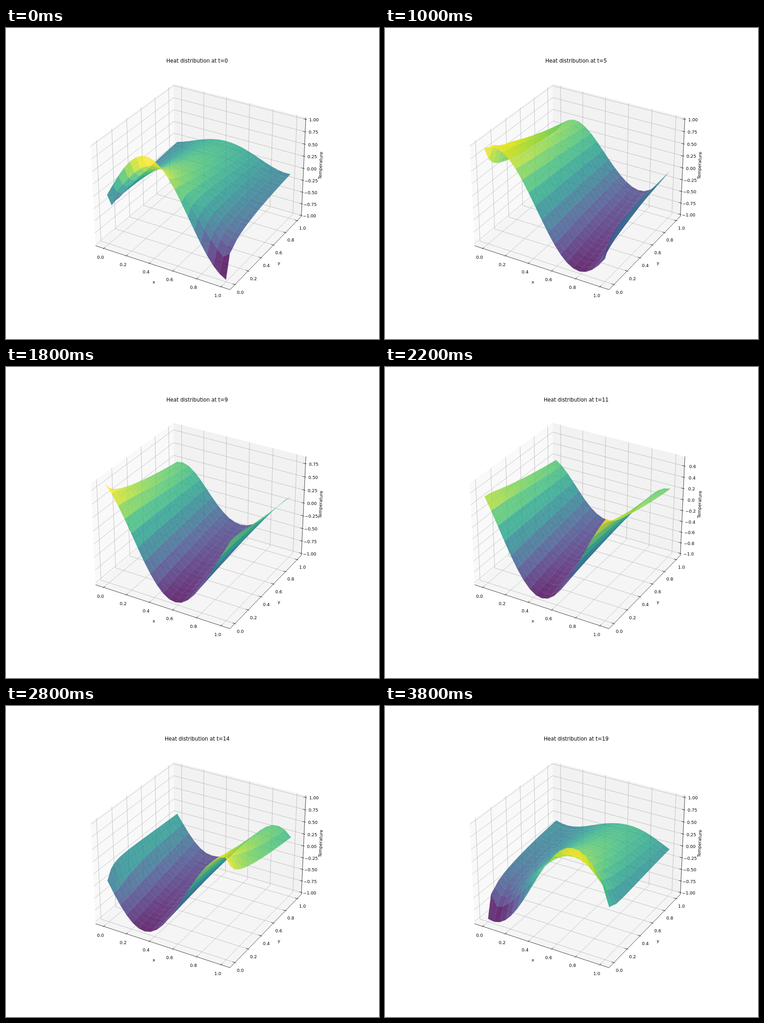
Recreate the animation shown at these times as an HTML page with a canvas. Size 820 px wide and 683 px high, loop 4000 ms.

```html
<!DOCTYPE html>
<html lang="en">
<head>
<meta charset="utf-8">
<title>Heat distribution</title>
<style>
  html, body { margin: 0; width: 100%; height: 100%; overflow: hidden; background: #fff; }
  svg, canvas { position: absolute; left: 0; top: 0; width: 820px; height: 683px; }
  text { font-family: "DejaVu Sans", Verdana, sans-serif; font-size: 9.49px; text-anchor: middle; }
  .title { font-size: 11.39px; }
  .grid { fill: none; stroke: #b0b0b0; stroke-width: .76; }
  .axis { fill: none; stroke: #000; stroke-width: .76; }
</style>
</head>
<body>
<svg viewBox="0 0 820 683">
  <g id="fixed"></g>
  <g id="zaxis"></g>
  <text id="title" class="title" x="420.2" y="76.3"></text>
  <text x="325" y="561">x</text>
  <text x="600" y="518.6">y</text>
  <text transform="translate(694.8 302) rotate(-87.4)">Temperature</text>
</svg>
<canvas id="surface" width="1200" height="1000"></canvas>
<script>
const N = 20, FRAME_MS = 200, WAVE = 4.5, DIFFUSIVITY = 0.01;
const STEP = 1 / (N - 1);
const MIX = DIFFUSIVITY * STEP / (STEP * STEP);
const LO = -0.05 - 1.1 / 48, HI = 1 - LO, TICK = 1.1 / 12;
const range = n => Array.from({ length: n }, (_, i) => i);
const byId = id => document.getElementById(id);

// Explicit heat steps on a periodic (x, t) plane; each step is one row along y.
function diffuse(u) {
  const wrap = i => (i + N) % N;
  return u.map((row, i) => row.map((v, j) => v + MIX * (
    u[wrap(i - 1)][j] + u[wrap(i + 1)][j] + row[wrap(j - 1)] + row[wrap(j + 1)] - 4 * v)));
}
const field = [range(N).map(i => range(N).map(j => Math.sin(WAVE * (i + j) * STEP)))];
while (field.length < N) field.push(diffuse(field[field.length - 1]));

// Perspective camera at azimuth -60, elevation 30; h is height in [-0.5, 0.5].
const BOX = 8 / 7 / 1.1, TALL = 6 / 7, SCALE = 2842.8, C30 = Math.sqrt(3) / 2;
function project(x, y, h) {
  const a = (x - 0.5) * BOX, b = (y - 0.5) * BOX, c = h * TALL;
  const depth = 10 - (C30 / 2 * a - 0.75 * b + 0.5 * c);
  return [
    427.3 + SCALE * (C30 * a + 0.5 * b) / depth,
    337.8 - SCALE * (-0.25 * a + C30 / 2 * b + C30 * c) / depth,
    depth
  ];
}

const VIRIDIS = [
  [0.27773, 0.10509, -0.33086, -4.63423, 6.22827, 4.77638, -5.43546],
  [0.00541, 1.40461, 0.21485, -5.7991, 14.17993, -13.74515, 4.64585],
  [0.3341, 1.38459, 0.0951, -19.33244, 56.69055, -65.35303, 26.31244]
];
const viridis = s => "rgb(" + VIRIDIS.map(poly =>
  Math.round(255 * Math.min(1, Math.max(0, poly.reduceRight((sum, k) => sum * s + k, 0))))) + ")";

const points = corners => corners.map(c => project(...c).slice(0, 2).map(v => v.toFixed(2))).join(" ");
const line = (kind, ...corners) => `<polyline class="${kind}" points="${points(corners)}"/>`;
const pane = (fill, ...corners) => `<polygon fill="${fill}" points="${points(corners)}"/>`;
const label = (text, at, dx, dy) => {
  const [x, y] = project(...at);
  return `<text x="${(x + dx).toFixed(2)}" y="${(y + dy + 3.46).toFixed(2)}">${text}</text>`;
};

const B = -0.5 - 1 / 48, T = -B;

function drawFixed() {
  let out = pane("#f9f9f9", [LO, LO, B], [LO, HI, B], [LO, HI, T], [LO, LO, T])
    + pane("#f2f2f2", [LO, HI, B], [HI, HI, B], [HI, HI, T], [LO, HI, T])
    + pane("#f5f5f5", [LO, LO, B], [HI, LO, B], [HI, HI, B], [LO, HI, B]);
  const ticks = range(6).map(i => i / 5);
  for (const v of ticks) {
    out += line("grid", [v, LO, B], [v, HI, B], [v, HI, T])
      + line("grid", [LO, v, T], [LO, v, B], [HI, v, B]);
  }
  for (const v of ticks) {
    out += line("axis", [v, LO + 0.2 * TICK, B], [v, LO - 0.1 * TICK, B])
      + line("axis", [HI - 0.2 * TICK, v, B], [HI + 0.1 * TICK, v, B])
      + label(v.toFixed(1), [v, LO, B], -7, 19)
      + label(v.toFixed(1), [HI, v, B], 11.7, 16.6);
  }
  out += line("axis", [LO, LO, B], [HI, LO, B], [HI, HI, B], [HI, HI, T]);
  byId("fixed").innerHTML = out;
}

function drawZAxis(zMin, zMax) {
  const span = zMax - zMin, margin = span / 48;
  const step = span / 9 <= 0.2 ? 0.2 : 0.25;
  let out = "";
  for (let i = Math.ceil((zMin - margin) / step); i * step <= zMax + margin; i++) {
    const z = i * step, h = (z - zMin) / span - 0.5;
    const text = (z < 0 ? "\u2212" : "") + Math.abs(z).toFixed(step === 0.2 ? 1 : 2);
    out += line("grid", [LO, LO, h], [LO, HI, h], [HI, HI, h])
      + line("axis", [HI - 0.2 * TICK, HI, h], [HI + 0.1 * TICK, HI, h])
      + label(text, [HI, HI, h], 18, 1);
  }
  byId("zaxis").innerHTML = out;
}

const ctx = byId("surface").getContext("2d");
ctx.scale(1200 / 820, 1000 / 683);

function drawSurface(t, zMin, zMax) {
  const faces = [];
  for (let j = 0; j < N - 1; j++) {
    for (let i = 0; i < N - 1; i++) {
      const cell = [[i, j], [i + 1, j], [i + 1, j + 1], [i, j + 1]];
      const heights = cell.map(([a, b]) => field[b][a][t]);
      const path = cell.map(([a, b], k) =>
        project(a * STEP, b * STEP, (heights[k] - zMin) / (zMax - zMin) - 0.5));
      faces.push({
        path,
        mean: heights.reduce((s, v) => s + v) / 4,
        depth: path.reduce((s, p) => s + p[2], 0)
      });
    }
  }
  const means = faces.map(f => f.mean);
  const low = Math.min(...means), high = Math.max(...means);
  faces.sort((a, b) => b.depth - a.depth);
  ctx.clearRect(0, 0, 820, 683);
  ctx.globalAlpha = 0.8;
  for (const { path, mean } of faces) {
    ctx.fillStyle = viridis((mean - low) / (high - low));
    ctx.beginPath();
    for (const [x, y] of path) ctx.lineTo(x, y);
    ctx.closePath();
    ctx.fill();
  }
}

function draw(t) {
  const values = field.flatMap(rows => rows.map(row => row[t]));
  const zMin = Math.min(...values), zMax = Math.max(...values);
  byId("title").textContent = "Heat distribution at t=" + t;
  drawZAxis(zMin, zMax);
  drawSurface(t, zMin, zMax);
}

const start = performance.now();
let shown = -1;
function tick() {
  const t = Math.floor((performance.now() - start) / FRAME_MS) % N;
  if (t !== shown) draw(shown = t);
  requestAnimationFrame(tick);
}
drawFixed();
tick();
</script>
</body>
</html>
```
